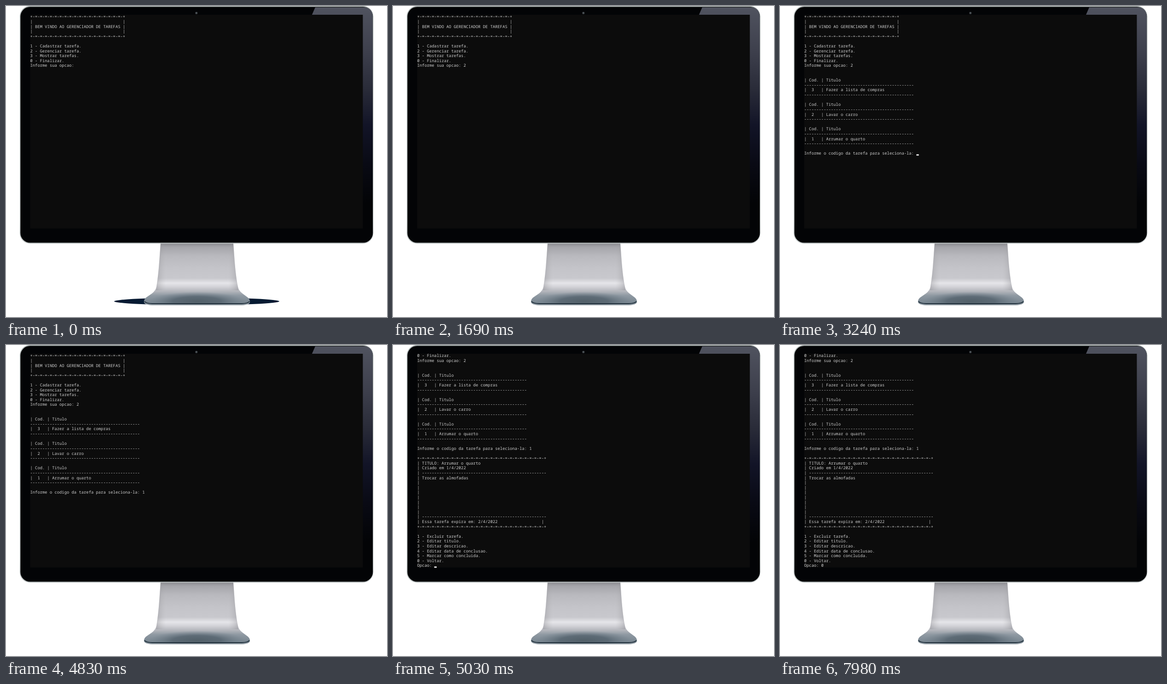
These frames come from a looping animation (828x676 px, 8000 ms). An HTML page:

```html
<!DOCTYPE html>
<html lang="pt">
<head>
<meta charset="utf-8">
<title>Gerenciador de tarefas</title>
<style>
  html, body { margin: 0; width: 100%; height: 100%; overflow: hidden; background: #fff; }
  svg { display: block; width: 828px; height: 676px; }
  text {
    font: 8.837px "Noto Sans Mono", "DejaVu Sans Mono", monospace;
    font-variant-ligatures: none;
    text-rendering: geometricPrecision;
    white-space: pre;
    fill: #d0d0d0;
  }
</style>
</head>
<body>
<svg viewBox="0 0 828 676">
  <defs>
    <linearGradient id="rim" x1="0" y1="0" x2="0" y2="1">
      <stop offset="0" stop-color="#a3aaa9"/>
      <stop offset=".05" stop-color="#ccd3d2"/>
      <stop offset=".9" stop-color="#d3d8d7"/>
      <stop offset="1" stop-color="#bcc2c2"/>
    </linearGradient>
    <linearGradient id="glare" gradientUnits="userSpaceOnUse" x1="0" y1="3" x2="0" y2="430">
      <stop offset="0" stop-color="#50535f"/>
      <stop offset=".22" stop-color="#3e404d"/>
      <stop offset=".42" stop-color="#292b38"/>
      <stop offset=".6" stop-color="#121427"/>
      <stop offset=".8" stop-color="#090a14"/>
      <stop offset="1" stop-color="#030406"/>
    </linearGradient>
    <linearGradient id="metal" gradientUnits="userSpaceOnUse" x1="0" y1="516" x2="0" y2="651">
      <stop offset="0" stop-color="#8b8b90"/>
      <stop offset=".06" stop-color="#a5a5aa"/>
      <stop offset=".2" stop-color="#b9b9be"/>
      <stop offset=".4" stop-color="#c4c4c9"/>
      <stop offset=".56" stop-color="#c8c8cd"/>
      <stop offset=".64" stop-color="#e5e5e9"/>
      <stop offset=".7" stop-color="#d2d2d7"/>
      <stop offset=".77" stop-color="#b4b6bc"/>
      <stop offset=".84" stop-color="#8f99a2"/>
      <stop offset="1" stop-color="#71808b"/>
    </linearGradient>
    <linearGradient id="sides" gradientUnits="userSpaceOnUse" x1="326" y1="0" x2="505" y2="0">
      <stop offset="0" stop-color="#77777d" stop-opacity=".35"/>
      <stop offset=".12" stop-color="#aaa" stop-opacity="0"/>
      <stop offset=".88" stop-color="#aaa" stop-opacity="0"/>
      <stop offset="1" stop-color="#77777d" stop-opacity=".35"/>
    </linearGradient>
    <radialGradient id="foot" gradientUnits="userSpaceOnUse" cx="415" cy="642" r="105"
      gradientTransform="translate(0 513.6) scale(1 .2)">
      <stop offset="0" stop-color="#526069"/>
      <stop offset=".5" stop-color="#56646f" stop-opacity=".85"/>
      <stop offset="1" stop-color="#6e7c87" stop-opacity="0"/>
    </radialGradient>
    <path id="stand" d="M336 515H494L497 556Q500 592 504 610Q506 619 514 625L526 634Q531 639 530 644Q529 648 516 649H314Q301 648 300 644Q299 639 304 634L317 625Q325 619 327 610Q331 585 333 556Z"/>
  </defs>

  <ellipse id="shadow" cx="414.5" cy="642" rx="179.5" ry="8" fill="#061a32"/>

  <path d="M300 642Q299 650 318 651H512Q531 650 530 642Z" fill="#b3babf"/>
  <use href="#stand" fill="url(#metal)"/>
  <path d="M336 516H494L497 556Q500 592 504 610L505 618H326L327 610Q331 585 333 556Z" fill="url(#sides)"/>
  <ellipse cx="415" cy="641" rx="105" ry="20" fill="url(#foot)" clip-path="url(#standClip)"/>
  <clipPath id="standClip"><use href="#stand"/></clipPath>
  <path d="M301 642Q304 646.5 318 647H512Q526 646.5 529 642" fill="none" stroke="#23323d" stroke-width="1.8"/>

  <rect x="29.5" y="0" width="769" height="516.5" rx="23" fill="url(#rim)"/>
  <rect x="31.3" y="2" width="766" height="512.5" rx="21" fill="#030406"/>
  <path d="M672 3H777Q797 3 797 24V430H775V19H665Z" fill="url(#glare)"/>
  <circle cx="413.8" cy="15.3" r="2.8" fill="#303337"/>
  <circle cx="413.8" cy="15.1" r="1.2" fill="#69777a"/>
  <rect x="52.5" y="19" width="723" height="464.5" fill="#0c0c0c"/>

  <g id="lines"></g>
  <rect id="cursor" width="5.3" height="2.8" fill="#f2f2f2"/>
</svg>

<script>
const LOOP = 8000, ROWS = 44;
const LEFT = 52.5, BASE = 26.4, COL = 5.302, PITCH = 10.605;

const border = n => "+" + "-=".repeat(n) + "-+\n";
const side = "|" + " ".repeat(37) + "|\n";
const rule = "-".repeat(45) + "\n";
const item = (code, title) =>
  "| Cod. | Titulo\n" + rule + `|  ${code}   | ${title}\n` + rule + "\n";
const cardRule = "| " + "-".repeat(51) + "\n";

const menu = border(18) + side + "| BEM VINDO AO GERENCIADOR DE TAREFAS |\n" + side + border(18) +
  "\n1 - Cadastrar tarefa.\n2 - Gerenciar tarefa.\n3 - Mostrar tarefas.\n0 - Finalizar.\n" +
  "Informe sua opcao: ";
const list = "\n\n\n" + item(3, "Fazer a lista de compras") + item(2, "Lavar o carro") +
  item(1, "Arrumar o quarto") + "Informe o codigo da tarefa para seleciona-la: ";
const card = "\n\n" + border(25) + "| TITULO: Arrumar o quarto\n| Criado em 1/4/2022\n" + cardRule +
  "| Trocar as almofadas\n" + "|\n".repeat(7) + cardRule +
  "| Essa tarefa expira em: 2/4/2022".padEnd(51) + "|\n" + border(25) + "\n1 - Excluir tar";
const actions = "efa.\n2 - Editar titulo.\n3 - Editar descricao.\n4 - Editar data de conclusao.\n" +
  "5 - Marcar como concluida.\n0 - Voltar.\nOpcao: ";

// [time, printed text, cursor visible]
const steps = [
  [0, menu, 0], [430, "2", 1], [630, "", 0], [1160, "", 1], [1690, "", 0],
  [1820, list, 1], [2710, "", 0], [3240, "", 1], [3770, "", 0], [4300, "1", 1], [4830, "", 0],
  [4960, card, 1], [5030, actions, 1], [5910, "", 0], [6370, "", 1], [6900, "", 0], [7450, "", 1],
  [7850, "0", 1], [7980, "", 0]
];

const byId = id => document.getElementById(id);
const shadow = byId("shadow"), cursor = byId("cursor");
const rows = Array.from({ length: ROWS }, (_, i) => {
  const row = document.createElementNS("http://www.w3.org/2000/svg", "text");
  row.setAttribute("x", LEFT);
  row.setAttribute("y", BASE + i * PITCH);
  byId("lines").append(row);
  return row;
});
const show = (el, on) => el.setAttribute("visibility", on ? "visible" : "hidden");

let shown = -1;
function draw(t) {
  show(shadow, t < 100);
  const past = steps.filter(s => s[0] <= t);
  if (past.length === shown) return;
  shown = past.length;

  const lines = past.map(s => s[1]).join("").split("\n").slice(-ROWS);
  rows.forEach((row, i) => row.textContent = lines[i] || "");
  const last = lines.length - 1;
  cursor.setAttribute("x", LEFT + lines[last].length * COL);
  cursor.setAttribute("y", BASE - 1 + last * PITCH);
  show(cursor, past[shown - 1][2]);
}

function tick() {
  draw(performance.now() % LOOP);
  requestAnimationFrame(tick);
}
tick();
</script>
</body>
</html>
```
